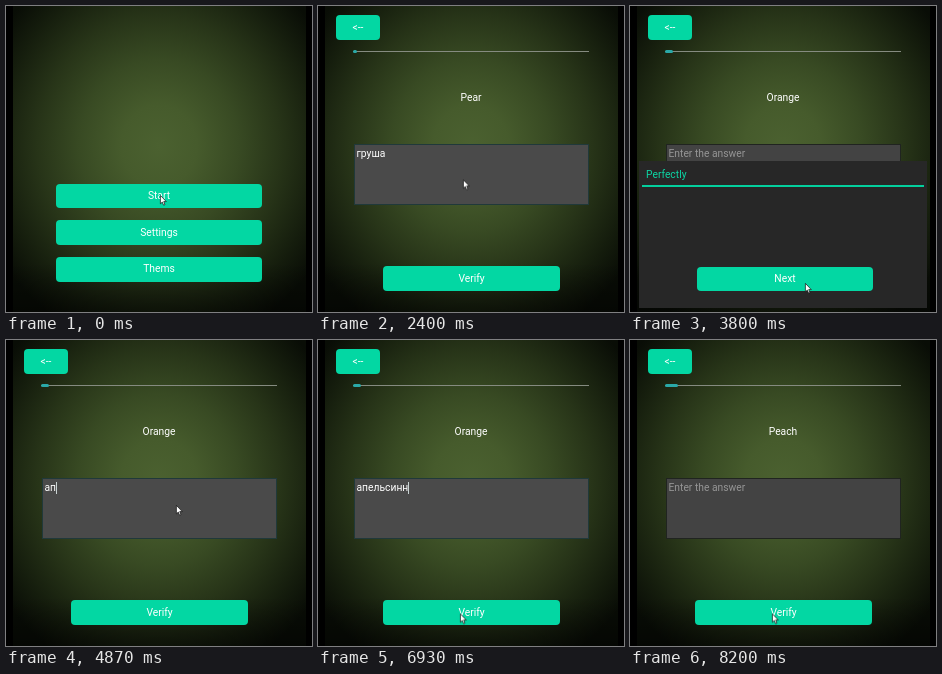
An HTML page for the animation above (8.27 s loop, 306 px wide and 306 px high).

```html
<!DOCTYPE html>
<html lang="en">
<head>
<meta charset="utf-8">
<title>Vocabulary quiz</title>
<style>
  html, body { margin: 0; width: 100%; height: 100%; overflow: hidden; background: #000; }
  #stage {
    --loop: 8270ms;
    position: relative; width: 306px; height: 306px; overflow: hidden;
    font: 10.3px/12px Roboto, "Noto Sans", sans-serif; color: #fff; cursor: default;
  }
  #stage div, #stage svg { position: absolute; box-sizing: border-box; }
  .layer { inset: 0; }
  #backdrop {
    left: 7px; top: 0; width: 293px; height: 306px;
    background:
      linear-gradient(#0000 84%, #0007 100%),
      radial-gradient(ellipse 190px 205px at 146px 140px,
        #4b6130 0%, #465b2c 20%, #384a23 42%, #273418 64%, #151d0d 85%, #090d06 100%);
  }
  .button {
    display: flex; align-items: center; justify-content: center;
    background: #03d7a3; border-radius: 4px;
  }

  #menu { animation: menu var(--loop) step-end infinite; }
  #quiz { animation: quiz var(--loop) step-end infinite; }
  @keyframes menu { 0% { visibility: visible } 2.418%, 100% { visibility: hidden } }
  @keyframes quiz { 0% { visibility: hidden } 2.418%, 100% { visibility: visible } }

  #track { left: 35px; top: 45px; width: 236px; height: 1.3px; background: #858b80; }
  #done { left: 35px; top: 43.8px; height: 3.4px; border-radius: 1.7px; background: #2aa9a8; }
  #word { left: 0; width: 306px; top: 86px; text-align: center; }
  #field {
    left: 36px; top: 138px; width: 235px; height: 61px; padding: 2.5px 0 0 1.5px;
    white-space: nowrap; background: #434343; border: 1px solid #202420;
  }
  #field.focus { background: #4a4a4a; border-color: #20393a; }
  #field.empty #typed { color: #959595; }
  #caret {
    display: inline-block; width: 1px; height: 12px; margin-right: -1px;
    vertical-align: top; background: #c9d3d3;
  }

  #veil { background: #000; opacity: 0; animation: veil var(--loop) linear infinite; }
  @keyframes veil {
    0%, 33.857% { opacity: 0 } 35.067%, 44.377% { opacity: .7 }
    45.586%, 84.643% { opacity: 0 } 85.852%, 93.47% { opacity: .7 }
    94.68%, 100% { opacity: 0 }
  }
  #sheet {
    left: 9px; top: 155px; width: 288px; height: 147px; background: #272727;
    animation: sheet var(--loop) step-end infinite;
  }
  @keyframes sheet {
    0%, 46.796%, 95.526%, 100% { visibility: hidden }
    33.857%, 84.643% { visibility: visible }
  }
  #verdict { left: 7px; top: 8px; color: #0cd6a4; }
  #rule { left: 3px; top: 24px; width: 282px; height: 1.8px; background: #03cf9d; }

  #mouse {
    left: 0; top: 0; width: 8px; height: 12px; overflow: visible;
    animation: mouse var(--loop) ease-in-out infinite;
  }
  @keyframes mouse {
    0%, 4.23% { transform: translate(154px, 189px) }
    10.88%, 29.38% { transform: translate(145px, 173.5px) }
    33.01%, 47.16% { transform: translate(175px, 277px) }
    53.2%, 77.39% { transform: translate(170px, 165px) }
    82.95%, 100% { transform: translate(142px, 273.5px) }
  }
</style>
</head>
<body>
<div id="stage">
  <div id="backdrop"></div>

  <div id="menu" class="layer">
    <div class="button" style="left:50px;top:177.5px;width:206px;height:24.5px">Start</div>
    <div class="button" style="left:50px;top:214px;width:206px;height:25px">Settings</div>
    <div class="button" style="left:50px;top:251px;width:206px;height:24.5px">Thems</div>
  </div>

  <div id="quiz" class="layer">
    <div class="button" style="left:18px;top:9px;width:44px;height:25px">&lt;--</div>
    <div id="track"></div>
    <div id="done"></div>
    <div id="word"></div>
    <div id="field"><span id="typed"></span><span id="caret"></span></div>
    <div class="button" style="left:65px;top:260px;width:177px;height:25px">Verify</div>
  </div>

  <div id="veil" class="layer"></div>
  <div id="sheet">
    <div id="verdict">Perfectly</div>
    <div id="rule"></div>
    <div class="button" style="left:58px;top:106px;width:176px;height:24px">Next</div>
  </div>

  <svg id="mouse" viewBox="0 0 8 12">
    <path d="M.4 .4V8.8L2.3 7.1 3.6 10.2 5 9.6 3.7 6.6H6.3Z"
          fill="#fff" stroke="#111" stroke-width=".7"/>
  </svg>
</div>

<script>
  const $ = id => document.getElementById(id);
  const LOOP = 8270, BLINK = 500;

  // Times in ms; "click" is the moment the answer is checked.
  const rounds = [
    { start: 0, word: "Pear", answer: "груша", focus: 1000, click: 2730, blur: 2800,
      keys: [1250, 1400, 1540, 1700, 1850], width: 4 },
    { start: 3670, word: "Orange", answer: "апельсинн", focus: 4470, click: 6930, blur: 7000,
      keys: [4670, 4830, 5000, 5150, 5300, 5450, 5600, 5750, 5900], width: 7.5 },
    { start: 7730, word: "Peach", answer: "", focus: LOOP, click: LOOP, blur: LOOP,
      keys: [], width: 12.5 }
  ];

  function draw(t) {
    const round = rounds.findLast(r => t >= r.start);
    const count = round.keys.filter(k => t >= k).length;
    const focused = t >= round.focus && t < round.blur;
    const lastInput = count ? round.keys[count - 1] : round.focus;
    const blinkOn = Math.floor((t - lastInput) / BLINK) % 2 === 0;
    const next = rounds[rounds.indexOf(round) + 1];

    $("word").textContent = round.word;
    $("typed").textContent = count ? round.answer.slice(0, count) : "Enter the answer";
    $("field").classList.toggle("empty", !count);
    $("field").classList.toggle("focus", focused);
    $("caret").style.visibility = focused && count && blinkOn ? "inherit" : "hidden";
    $("done").style.width = (t >= round.click ? (round.width + next.width) / 2 : round.width) + "px";
  }

  // Share the CSS clock so typing and motion stay together.
  const clock = $("mouse").getAnimations()[0];
  function tick() {
    draw((clock.currentTime || 0) % LOOP);
    requestAnimationFrame(tick);
  }
  tick();
</script>
</body>
</html>
```
